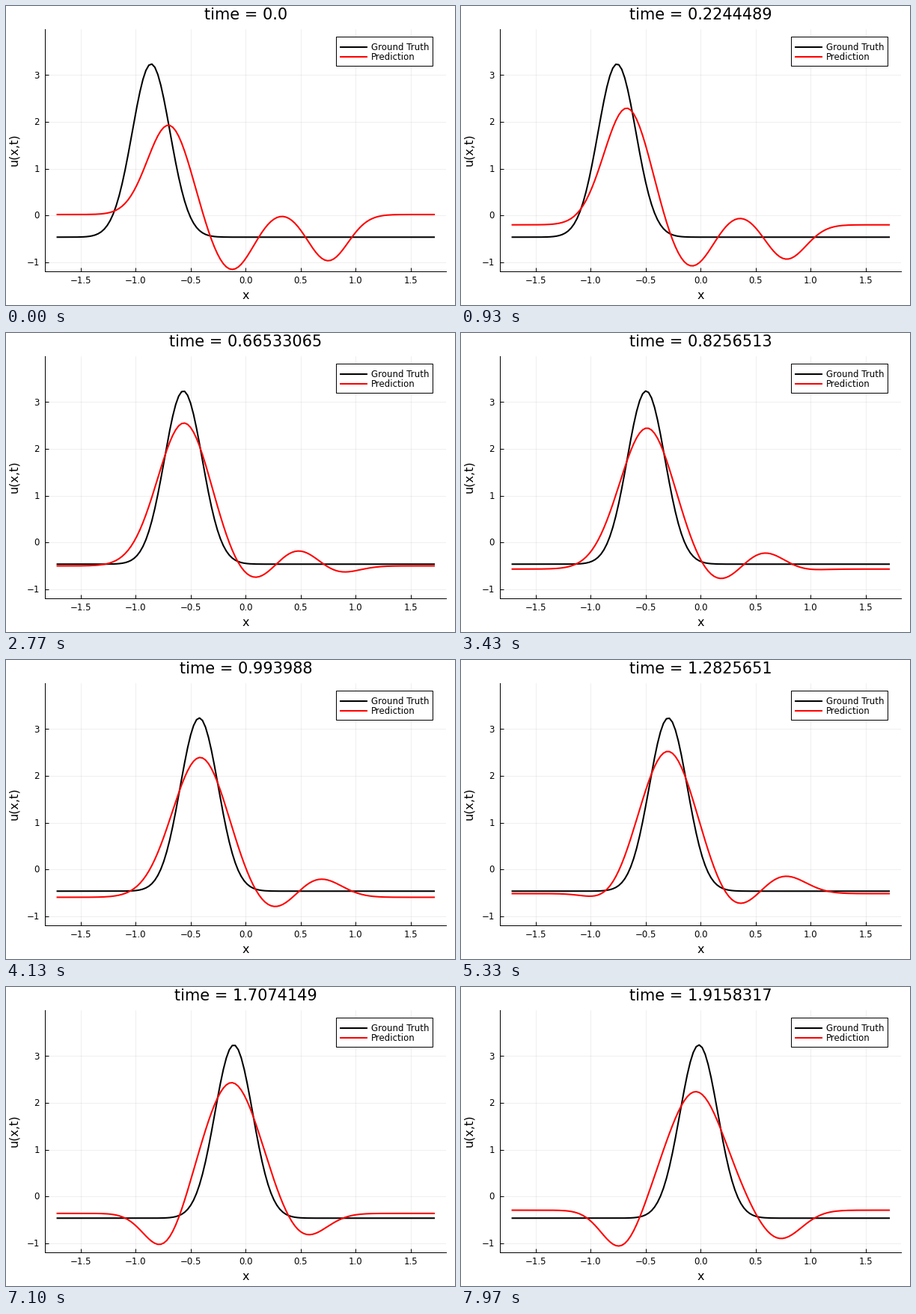
A matplotlib script for the animation above (8 s loop, 600x400 px).

```python
import numpy as np
import matplotlib.pyplot as plt
from matplotlib.animation import FuncAnimation
from matplotlib.patches import Rectangle

W, H, DPI = 600, 400, 100
LOOP_MS, TICK_MS, STEPS = 8000, 20, 240
LEFT, RIGHT, TOP, BOTTOM = 52.4, 588.2, 30.7, 355.2
ZERO_Y, UNIT_Y = 280.2, 62.6

plt.rcParams["font.family"] = "DejaVu Sans"


def px(n):
    """Pixels to points."""
    return n * 72 / DPI


N = 128
HALF = np.sqrt(3 * (N - 1) / (N + 1))
SPAN = 2 * HALF
x = np.linspace(-HALF, HALF, N)
times = np.linspace(0, 4, 500)[:STEPS]


def gauss(centre, width):
    return np.exp(-((x - centre) / width) ** 2 / 2)


def path(*points):
    """Smooth, overshoot-free curve through (time, value) points, held at the ends."""
    kt, kv = np.array(points, float).T
    h, d = np.diff(kt), np.diff(kv) / np.diff(kt)
    slope = np.concatenate([d[:1], np.zeros(len(d) - 1), d[-1:]])
    for i in range(1, len(d)):
        if d[i - 1] * d[i] > 0:
            slope[i] = 2 * d[i - 1] * d[i] / (d[i - 1] + d[i])

    def value(t):
        t = min(max(t, kt[0]), kt[-1])
        i = min(np.searchsorted(kt, t, side="right") - 1, len(d) - 1)
        s = (t - kt[i]) / h[i]
        ease = s * s * (3 - 2 * s)
        return (kv[i] + (kv[i + 1] - kv[i]) * ease
                + h[i] * s * (1 - s) * ((1 - s) * slope[i] - s * slope[i + 1]))
    return value


def fixed(v):
    return lambda t: v


def truth(t):
    """A unit-variance Gaussian pulse moving at constant speed."""
    return 3.702 * gauss((0.128 * t - 0.25) * SPAN, 0.05 * SPAN) - 0.464


# Prediction: a drifting base plus waves, each with (height, centre, width)
base = path((0, 0.02), (0.44, -0.375), (0.98, -0.595), (1.5, -0.43), (1.92, -0.292))
crest = (path((0, 1.93), (0.55, 3.07), (0.99, 2.99), (1.4, 3.06), (1.92, 2.53)),
         path((0, -0.697), (0.44, -0.635), (0.99, -0.415), (1.92, -0.043)),
         path((0, 0.195), (0.99, 0.255), (1.92, 0.264)))
dip = (path((0, -1.21), (0.44, -0.715), (0.75, -0.345), (1, -0.345),
            (1.45, -0.455), (1.92, -0.645)),
       path((0, -0.131), (0.44, -0.045), (0.99, 0.232), (1.5, 0.372), (1.92, 0.711)),
       fixed(0.2))
ripple = (path((0, 0.12), (0.44, 0.37), (1.2, 0.42), (1.7, 0)),
          path((0, 0.32), (0.44, 0.367), (0.99, 0.662), (1.92, 0.9)),
          fixed(0.2))
far_dip = (path((0, -1), (0.44, -0.51), (0.665, -0.185), (0.95, 0)),
           path((0, 0.745), (0.7, 0.825)),
           fixed(0.183))
wake = (path((1, 0), (1.28, -0.215), (1.5, -0.7), (1.8, -0.85)),
        path((1, -0.92), (1.5, -0.768), (1.92, -0.719)),
        fixed(0.175))
WAVES = crest, dip, ripple, far_dip, wake


def prediction(t):
    return base(t) + sum(a(t) * gauss(c(t), w(t)) for a, c, w in WAVES)


# Plot area
fig = plt.figure(figsize=(W / DPI, H / DPI), dpi=DPI, facecolor="white")
ax = fig.add_axes([LEFT / W, 1 - BOTTOM / H, (RIGHT - LEFT) / W, (BOTTOM - TOP) / H])
ax.set_xlim(-1.06 * HALF, 1.06 * HALF)
ax.set_ylim((ZERO_Y - BOTTOM) / UNIT_Y, (ZERO_Y - TOP) / UNIT_Y)
ax.set_xticks(np.arange(-1.5, 1.6, 0.5))
ax.set_yticks(range(-1, 4))
ax.tick_params(direction="in", length=px(5), width=px(1),
               labelbottom=False, labelleft=False)
ax.grid(color="black", alpha=0.1, linewidth=px(0.6))
ax.set_axisbelow(True)
ax.spines[["top", "right"]].set_visible(False)
ax.spines[["left", "bottom"]].set_linewidth(px(1))

LINE = dict(linewidth=px(2.05), solid_capstyle="butt", solid_joinstyle="round")
truth_line, = ax.plot(x, truth(0), color="black", zorder=3, **LINE)
pred_line, = ax.plot(x, prediction(0), color="red", zorder=4, **LINE)

# Labels and legend in pixel coordinates
top = fig.add_axes([0, 0, 1, 1], zorder=5)
top.set_xlim(0, W)
top.set_ylim(H, 0)
top.axis("off")


def label(lx, ly, text, size, ha="center", **kw):
    return top.text(lx, ly, text.replace("-", "\u2212"), fontsize=px(size),
                    ha=ha, va="baseline", **kw)


x_mid = (LEFT + RIGHT) / 2
x_unit = (RIGHT - LEFT) / (1.06 * SPAN)
for v in ax.get_xticks():
    label(x_mid + v * x_unit, 371.4, f"{v:.1f}", 11.7)
for v in range(-1, 4):
    label(45, ZERO_Y + 4.2 - UNIT_Y * v, str(v), 11.7, ha="right")
label(x_mid, 392, "x", 16)
label(15, 192.3, "u(x,t)", 16, rotation=90, rotation_mode="anchor")
title = label(x_mid, 18.3, "", 20.9)

top.add_patch(Rectangle((441, 41), 129, 39, facecolor="white",
                        edgecolor="black", linewidth=px(1)))
for ly, text, color in ((54.6, "Ground Truth", "black"), (67.7, "Prediction", "red")):
    top.plot([446, 483], [ly, ly], color=color, **LINE)
    label(487.7, ly + 4.3, text, 11.8, ha="left")


def draw(i):
    t = times[(3 * i + 2) // 5]  # 30 steps a second on a 20 ms clock
    truth_line.set_ydata(truth(t))
    pred_line.set_ydata(prediction(t))
    title.set_text(f"time = {str(np.float32(t))}")
    return truth_line, pred_line, title


anim = FuncAnimation(fig, draw, frames=LOOP_MS // TICK_MS, interval=TICK_MS,
                     repeat=True, repeat_delay=0)
plt.show()
```
